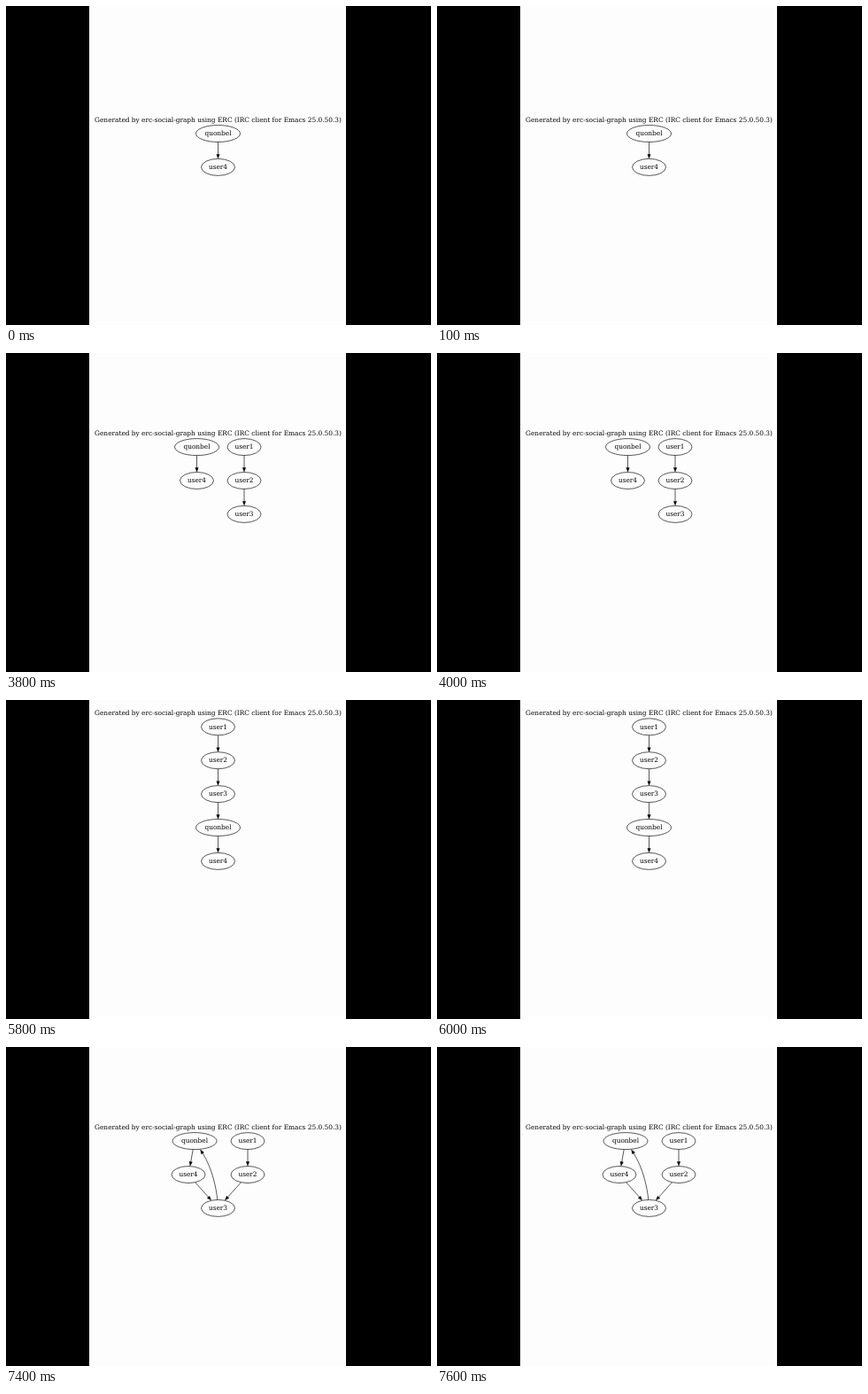
Animation, 480 px wide and 360 px high, one loop 8 s. Source, as an HTML page:

```html
<!DOCTYPE html>
<html lang="en">
<head>
<meta charset="utf-8">
<title>Social graph</title>
<style>
  html, body { margin: 0; width: 100%; height: 100%; overflow: hidden; background: #000; }
  svg { display: block; }
  text { font: 7.4px "DejaVu Serif", "Noto Serif", serif; text-anchor: middle; text-rendering: geometricPrecision; }
  ellipse, path { fill: none; stroke: #000; stroke-width: .65; }
</style>
</head>
<body>
<svg width="480" height="360" viewBox="0 0 480 360">
  <rect x="94" width="290" height="360" fill="#fdfdfd"/>
  <g id="graph"></g>
</svg>
<script>
const LOOP = 8000, MID = 239.5, ROWS = [30.3, 68.2, 106.1, 144, 181.9];
const TITLE = "Generated by erc-social-graph using ERC (IRC client for Emacs 25.0.50.3)";
const HUB = "quonbel";
const graph = document.getElementById("graph");

const label = (text, x, y) => `<text x="${x}" y="${y}">${text}</text>`;

const node = ([name, x, row]) =>
  `<ellipse cx="${x}" cy="${ROWS[row]}" rx="${name === HUB ? 25 : 19}" ry="9.5"/>` +
  label(name, x, ROWS[row] + 2.2);

// Points: start, optional two controls, arrow tip.
function edge(...points) {
  const [tx, ty] = points.pop();
  const [px, py] = points[points.length - 1];
  const angle = Math.atan2(ty - py, tx - px);
  const base = [tx - 5 * Math.cos(angle), ty - 5 * Math.sin(angle)];
  const [start, ...controls] = points;
  const turn = angle * 180 / Math.PI;
  return `<path d="M${start} ${controls.length ? "C" : "L"}${[...controls, base].join(" ")}"/>` +
    `<polygon points="0,0 -5.4,-2 -5.4,2" transform="translate(${tx} ${ty}) rotate(${turn})"/>`;
}

// A column of nodes, each linked to the next one below.
const chain = (x, row, ...names) => names.map((name, i) =>
  node([name, x, row + i]) +
  (i ? edge([x, ROWS[row + i - 1] + 9.5], [x, ROWS[row + i] - 9.3]) : "")).join("");

const scene = (top, ...parts) => label(TITLE, MID, ROWS[top] - 13.4) + parts.join("");

const scenes = [
  [0, scene(3, chain(MID, 3, HUB, "user4"))],
  [3000, scene(3, chain(215.5, 3, HUB, "user4"), chain(269, 3, "user1", "user2"))],
  [3800, scene(2, chain(215.5, 2, HUB, "user4"), chain(269, 2, "user1", "user2", "user3"))],
  [5800, scene(0, chain(MID, 0, "user1", "user2", "user3", HUB, "user4"))],
  [7200, scene(2,
    chain(273, 2, "user1", "user2"),
    node([HUB, 213, 2]), node(["user4", 206, 3]), node(["user3", MID, 4]),
    edge([211.2, 115.6], [207.8, 134.7]),
    edge([213.7, 152.7], [232, 173.3]),
    edge([265.5, 152.7], [247, 173.3]),
    edge([238.8, 172.4], [237.5, 160], [233.5, 138], [219.3, 115.4]))]
];

let shown;
function draw(now) {
  const time = now % LOOP;
  const current = scenes.findLast(([start]) => start <= time)[1];
  if (current !== shown) graph.innerHTML = shown = current;
  requestAnimationFrame(draw);
}
draw(performance.now());
</script>
</body>
</html>
```
